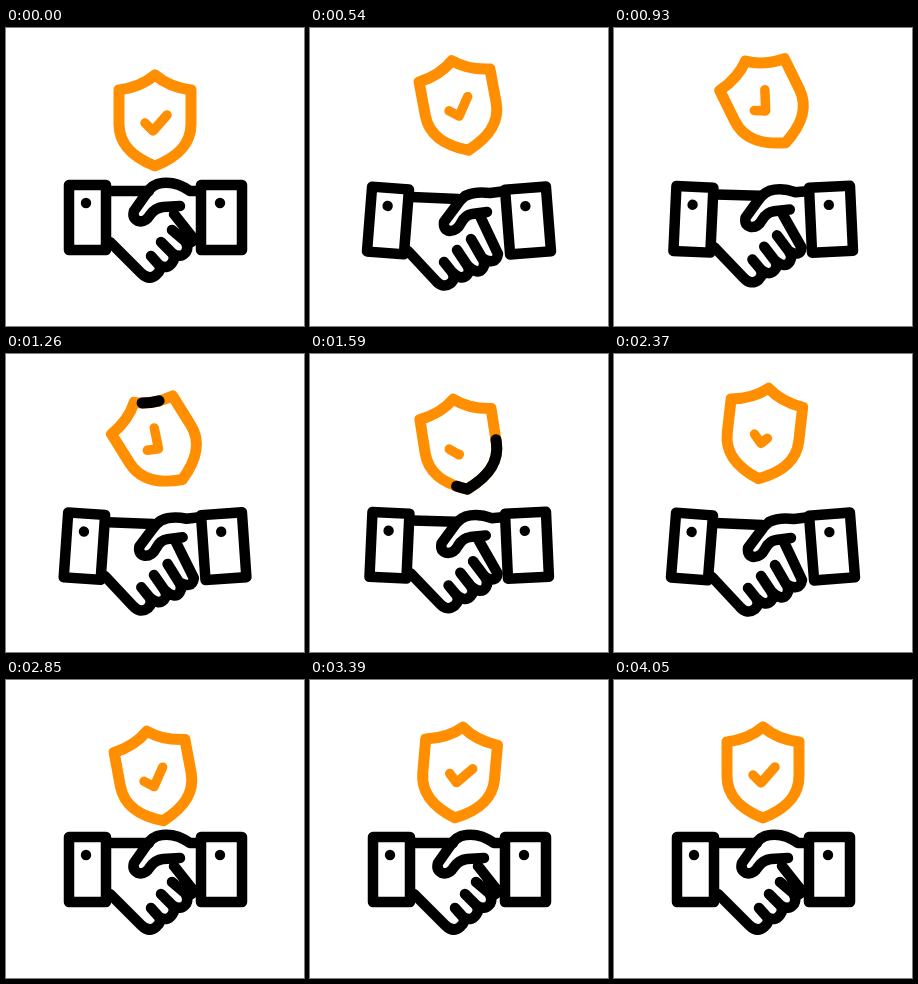
Animation, 298 px wide and 298 px high, one loop 4230 ms. Source, as an HTML page:

```html
<!DOCTYPE html>
<html lang="en">
<head>
<meta charset="utf-8">
<title>Trusted handshake</title>
<style>
  html, body { margin: 0; width: 100%; height: 100%; overflow: hidden; background: #fff; }
  svg { display: block; width: 100vw; height: 100vh; }
  .line { fill: none; stroke-linecap: round; stroke-linejoin: round; }
</style>
</head>
<body>
<svg viewBox="0 0 298 298">
  <g class="line" stroke="#000" stroke-width="10.5">
    <path id="palm"/>
    <path id="fingers"/>
    <path id="thumb"/>
    <g id="leftCuff">
      <rect x="-18.5" y="-32.5" width="37" height="65" fill="#fff"/>
      <circle cx="-1.5" cy="-14.5" r="5.2" fill="#000" stroke="none"/>
    </g>
    <g id="rightCuff">
      <rect x="-20.5" y="-32.5" width="41" height="65" fill="#fff"/>
      <circle cx="-1.5" cy="-14.5" r="5.2" fill="#000" stroke="none"/>
    </g>
  </g>
  <g id="shield" class="line" stroke="#ff8f00" stroke-width="11">
    <path id="rim"/>
    <path id="sweep" stroke="#000" pathLength="1"/>
    <path id="check" d="M-10 3L-2 11L12 -5" stroke-width="9.5" pathLength="1"/>
  </g>
</svg>
<script>
const LOOP = 4230, STEP = 30, LAST = 4050;
const el = id => document.getElementById(id);
const mix = (a, b, k) => a + (b - a) * k;

// Smooth curve through [time, value] keys, flat at the extremes.
function track(keys) {
  const slope = i => {
    const p = keys[i - 1], c = keys[i], n = keys[i + 1];
    if (!p || !n || (c[1] - p[1]) * (n[1] - c[1]) <= 0) return 0;
    return (n[1] - p[1]) / (n[0] - p[0]);
  };
  return t => {
    if (t <= keys[0][0]) return keys[0][1];
    const i = keys.findIndex(k => k[0] >= t);
    if (i < 0) return keys[keys.length - 1][1];
    const [t0, a] = keys[i - 1], [t1, b] = keys[i];
    const h = t1 - t0, u = (t - t0) / h, u2 = u * u, u3 = u2 * u;
    return a * (2 * u3 - 3 * u2 + 1) + b * (3 * u2 - 2 * u3)
      + h * (slope(i - 1) * (u3 - 2 * u2 + u) + slope(i) * (u3 - u2));
  };
}

// Blends the numbers of two path strings with the same commands.
function morph(from, to) {
  const target = to.match(/-?[\d.]+/g).map(Number);
  return k => {
    let i = 0;
    return from.replace(/-?[\d.]+/g, n => mix(+n, target[i++], k).toFixed(2));
  };
}

const palm = morph('M103 163L143 163', 'M102 169L148 171');
const fingers = morph(
  'M104 214L135 245Q143 253 150 247Q156 242 153 237L145 228M153 237Q161 242 166 235Q170 230 166 225L155 214' +
  'M166 225Q175 231 180 224Q183 219 179 213L166 202M179 213Q187 217 187 210L168 186',
  'M98 223L126 253Q133 261 141 255Q146 250 142 244L134 234M142 244Q151 253 157 247Q161 243 157 237L147 222' +
  'M157 237Q168 248 173 240Q176 235 172 230L161 211M172 230Q186 238 188 226L170 188');
const thumb = morph(
  'M194 163L184 163Q170 153 156 155Q146 156 140 166L128 183Q126 190 132 193Q139 195 144 187Q149 180 157 179L174 178',
  'M196 163L180 165Q165 163 155 168Q150 172 146 178L134 194Q133 202 140 203Q147 203 151 195Q155 187 162 186L177 184');

// Handshake: 0 is the resting pose, 1 the lowered pose.
const dip = track([[0, 0], [540, 1], [720, 1.5], [980, .5], [1260, .88], [1400, 1.25], [1640, .5],
  [1890, 1], [2050, 1.5], [2230, .6], [2370, 1], [2490, 1.5], [2760, 0]]);

const shiftX = track([[0, 0], [540, 1], [1260, 3], [1890, -.5], [2370, .5], [2850, 0]]);
const lift = track([[0, 0], [540, -15], [760, -21], [1110, -13], [1260, -5.5], [1480, 0], [1680, -4],
  [1890, 1], [2290, -15], [2370, -13], [2780, 4], [2850, 3.5], [3200, 0]]);
const tilt = track([[0, 0], [540, -10.5], [1200, -32.5], [1260, -32], [1890, 11.5], [2000, 12.5],
  [2370, 6.5], [2790, -11], [2850, -10.5], [3400, 5], [3800, -1.5], [LAST, 0]]);

const sweepStart = track([[1200, 0], [1260, .03], [1890, .52], [2250, 1]]);
const sweepEnd = track([[1200, 0], [1260, .095], [1890, .92], [2040, 1]]);
const checkDrawn = track([[1290, 1], [1800, 0], [1950, 0], [2370, .6], [2760, 1]]);

const outline = 'M0 -45Q14 -33 36 -30V4C36 26 20 38 0 46C-20 38 -36 26 -36 4V-30Q-14 -33 0 -45Z';
el('rim').setAttribute('d', outline);
el('sweep').setAttribute('d', outline);

function place(id, x, y, angle) {
  el(id).setAttribute('transform', `translate(${x} ${y}) rotate(${angle})`);
}

function trim(id, start, end) {
  const node = el(id);
  node.setAttribute('stroke-dasharray', `${Math.max(end - start, .001)} 2`);
  node.setAttribute('stroke-dashoffset', -start);
}

function draw(t) {
  const d = dip(t);
  el('palm').setAttribute('d', palm(d));
  el('fingers').setAttribute('d', fingers(d));
  el('thumb').setAttribute('d', thumb(d));
  place('leftCuff', mix(81.5, 78, d), mix(189.5, 192.5, d), 4.5 * d);
  place('rightCuff', mix(215.5, 218, d), mix(189.5, 192.5, d), -4.5 * d);

  const a = tilt(t);
  place('shield', 149 + shiftX(t), 92 + lift(t), a);

  const start = sweepStart(t), end = sweepEnd(t);
  el('sweep').style.display = end > start && start < 1 ? '' : 'none';
  trim('sweep', start, end);

  // The tick swings further than the shield around it.
  el('check').setAttribute('transform', `rotate(${-a}) translate(${.22 * a} 0) rotate(${1.65 * a})`);
  trim('check', 0, checkDrawn(t));
}

const begin = performance.now();
function tick() {
  const t = (performance.now() - begin) % LOOP;
  draw(Math.min(Math.floor(t / STEP) * STEP, LAST));
  requestAnimationFrame(tick);
}
tick();
</script>
</body>
</html>
```
